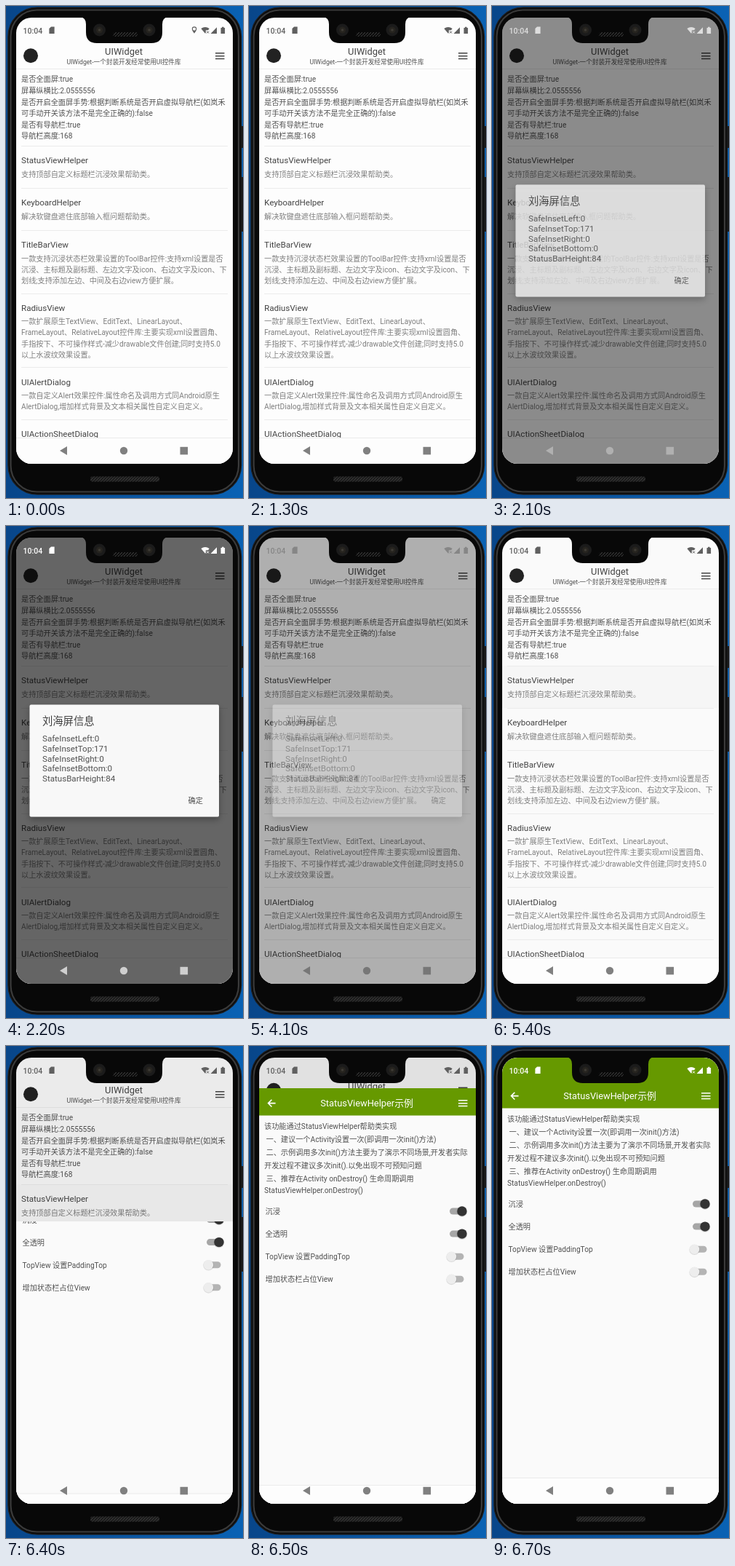
These frames come from a looping animation (326x676 px, 8000 ms). An HTML page:

```html
<!DOCTYPE html>
<html lang="zh-CN">
<head>
<meta charset="utf-8">
<title>UIWidget</title>
<style>
html, body { margin: 0; width: 100%; height: 100%; overflow: hidden; background: #0a5ca8; }
svg { display: block; width: 326px; height: 676px; }
text { font: 10.18px Roboto, "Noto Sans CJK SC", sans-serif; fill: #505050; }
.mid { text-anchor: middle; }
.head { font-size: 12.85px; }
.sub { font-size: 8.65px; }
.title, .body { font-size: 11.6px; }
.title, .head { fill: #444; }
.desc { fill: #7e7e7e; }
.ask { font-size: 14.3px; fill: #404040; }
.white { fill: #fff; }
.clock { font-size: 10.5px; font-weight: 500; fill: inherit; }
</style>
</head>
<body>
<svg viewBox="0 0 326 676">
  <defs>
    <linearGradient id="wall">
      <stop offset="0" stop-color="#08468a"/>
      <stop offset="1" stop-color="#0a62b4"/>
    </linearGradient>
    <pattern id="mesh" width="4" height="4" patternUnits="userSpaceOnUse">
      <path d="M0 4L4 0" stroke="#383838" stroke-width="1.2"/>
    </pattern>
    <clipPath id="glass"><rect x="14" y="16" width="298" height="613" rx="21"/></clipPath>
    <clipPath id="reveal"><rect id="revealBox" x="14" y="700" width="298" height="700"/></clipPath>
    <filter id="lift" x="-10%" y="-10%" width="120%" height="125%">
      <feDropShadow dx="0" dy="4" stdDeviation="5" flood-opacity=".3"/>
    </filter>
  </defs>

  <rect width="326" height="676" fill="url(#wall)"/>
  <path d="M324 165h2v30h-2zm0 70h2v75h-2z" fill="#151515"/>
  <rect x="3" y="2" width="320.5" height="669" rx="40" fill="#0a0a0a" stroke="#1c1c1c" stroke-width="1.5"/>
  <rect x="6.5" y="5.5" width="313.5" height="662" rx="36" fill="#080808" stroke="#3a3a3a" stroke-width="2.2"/>

  <g clip-path="url(#glass)">
    <g id="home">
      <rect id="homeBg" x="14" y="16" width="298" height="640"/>
      <rect id="tap" x="14" y="192" width="298" height="58" fill="#f6f6f6"/>
    </g>
    <rect id="scrim" x="14" y="16" width="298" height="613"/>
    <g clip-path="url(#reveal)"><g id="next">
      <rect x="14" y="16" width="298" height="640" fill="#fafafa"/>
      <rect x="14" y="16" width="298" height="69.5" fill="#690"/>
    </g></g>
    <g id="dialog">
      <rect x="32.5" y="245.5" width="260.5" height="154" rx="2" fill="#f8f8f8" filter="url(#lift)"/>
    </g>

    <g id="status">
      <text class="clock" x="23.5" y="37.5">10:04</text>
      <path d="M62 28.5h4.6v9.5h-7.2v-7z"/>
      <path id="pin" d="M259 28.3a3.2 3.2 0 0 1 3.2 3.3c0 2.3-3.2 6.2-3.2 6.2s-3.2-3.9-3.2-6.2a3.2 3.2 0 0 1 3.2-3.3zm0 1.1a2.1 2.1 0 1 0 0 4.3 2.1 2.1 0 0 0 0-4.3z" fill-rule="evenodd"/>
      <path d="M268.3 31q5.7-4 11.4 0l-1.7 2.3h-3.2v3.4l-.8 1z"/>
      <path d="M276 34.5l3 3m0-3l-3 3" stroke-width="1" class="line"/>
      <path d="M281.5 38l8.5-8.7V38z"/>
      <path d="M295.5 30h1.5v-1.2h2.6V30h1.5v8h-5.6z"/>
    </g>
    <g id="nav">
      <path d="M74 611l10-6v12z"/>
      <circle cx="162" cy="611" r="5.2"/>
      <rect x="239.5" y="605.8" width="10.6" height="10.6"/>
    </g>
  </g>

  <path d="M102 15q8 1 8 10v11q0 15 15 15h75q15 0 15-15V25q0-9 8-10z" fill="#080808"/>
  <g id="lenses"></g>
  <rect x="147" y="36" width="34" height="6" rx="3" fill="url(#mesh)"/>
  <rect x="116" y="646.5" width="95" height="7" rx="3" fill="#191919"/>
  <rect x="116" y="646.5" width="95" height="7" rx="3" fill="url(#mesh)"/>
</svg>
<script>
const $ = id => document.getElementById(id);

function add(parent, tag, attrs, content) {
  const el = document.createElementNS('http://www.w3.org/2000/svg', tag);
  for (const k in attrs) el.setAttribute(k, attrs[k]);
  if (content) el.textContent = content;
  return $(parent).appendChild(el);
}
const label = (parent, x, y, cls, content) => add(parent, 'text', { x, y, class: cls }, content);
const rule = (parent, y, x = 21, w = 284) =>
  add(parent, 'rect', { x, y, width: w, height: 1, fill: '#ebebeb' });
const menu = (parent, stroke) =>
  add(parent, 'path', { d: 'M288 64.8h12.5m-12.5 3.9h12.5m-12.5 3.9h12.5', stroke, 'stroke-width': 1.5 });

function navBar(parent) {
  add(parent, 'rect', { x: 14, y: 593, width: 298, height: 60, fill: '#fdfdfd' });
  rule(parent, 593, 14, 298);
}

// Home page
add('home', 'circle', { cx: 34, cy: 68.3, r: 10, fill: '#222' });
label('home', 162, 67.3, 'mid head', 'UIWidget');
label('home', 162, 80.2, 'mid sub', 'UIWidget-一个封装开发经常使用UI控件库');
const homeMenu = menu('home', '#444');
rule('home', 86, 14, 298);

['是否全面屏:true', '屏幕纵横比:2.0555556',
 '是否开启全面屏手势:根据判断系统是否开启虚拟导航栏(如岚禾',
 '可手动开关该方法不是完全正确的):false', '是否有导航栏:true', '导航栏高度:168']
  .forEach((s, i) => label('home', 21, 104.3 + i * 15.6, '', s));

[
  [216.3, 'StatusViewHelper', '支持顶部自定义标题栏沉浸效果帮助类。'],
  [274.3, 'KeyboardHelper', '解决软键盘遮住底部输入框问题帮助类。'],
  [332.3, 'TitleBarView', '一款支持沉浸状态栏效果设置的ToolBar控件:支持xml设置是否',
    '沉浸、主标题及副标题、左边文字及icon、右边文字及icon、下', '划线;支持添加左边、中间及右边view方便扩展。'],
  [419, 'RadiusView', '一款扩展原生TextView、EditText、LinearLayout、',
    'FrameLayout、RelativeLayout控件库:主要实现xml设置圆角、',
    '手指按下、不可操作样式-减少drawable文件创建;同时支持5.0', '以上水波纹效果设置。'],
  [520.8, 'UIAlertDialog', '一款自定义Alert效果控件:属性命名及调用方式同Android原生',
    'AlertDialog,增加样式背景及文本相关属性自定义自定义。'],
  [592, 'UIActionSheetDialog'],
].forEach(([y, title, ...lines]) => {
  rule('home', Math.round(y - 24.5));
  label('home', 21, y, 'title', title);
  lines.forEach((s, i) => label('home', 21, y + 18.2 + i * 15.2, 'desc', s));
});
navBar('home');

// Dialog
label('dialog', 50, 273.3, 'ask', '刘海屏信息');
['SafeInsetLeft:0', 'SafeInsetTop:171', 'SafeInsetRight:0', 'SafeInsetBottom:0', 'StatusBarHeight:84']
  .forEach((s, i) => label('dialog', 50, 296.3 + i * 13.65, 'body', s));
label('dialog', 250.5, 381, '', '确定');

// Detail page
add('next', 'path', { d: 'M36.5 68.6h-10m4.8-4.9l-4.9 4.9 4.9 4.9', stroke: '#fff', 'stroke-width': 1.6, fill: 'none' });
label('next', 162, 73, 'mid head white', 'StatusViewHelper示例');
menu('next', '#fff');
[
  [21, 104, '该功能通过StatusViewHelper帮助类实现'],
  [23.5, 122, '一、建议一个Activity设置一次(即调用一次init()方法)'],
  [23.5, 140, '二、示例调用多次init()方法主要为了演示不同场景,开发者实际'],
  [21, 158, '开发过程不建议多次init().以免出现不可预知问题'],
  [23.5, 176, '三、推荐在Activity onDestroy() 生命周期调用'],
  [21, 191.5, 'StatusViewHelper.onDestroy()'],
].forEach(([x, y, s]) => label('next', x, y, '', s));

['沉浸', '全透明', 'TopView 设置PaddingTop', '增加状态栏占位View'].forEach((s, i) => {
  const y = 217 + i * 31.1, on = i < 2;
  label('next', 22.5, y + 4, '', s);
  add('next', 'rect', { x: 276, y: y - 4.5, width: 19.5, height: 9, rx: 4.5, fill: on ? '#a6a6a6' : '#b4b4b4' });
  add('next', 'circle', { cx: on ? 293 : 278.5, cy: y + .7, r: 7.2, fill: '#000', opacity: .12 });
  add('next', 'circle', { cx: on ? 293 : 278.5, cy: y, r: 6.7, fill: on ? '#333' : '#ededed' });
});
navBar('next');

// Front cameras
for (const cx of [128.5, 197]) {
  add('lenses', 'circle', { cx, cy: 33, r: 8.5, fill: '#1b1b1b' });
  add('lenses', 'circle', { cx, cy: 33, r: 4.5, fill: '#26241f' });
  add('lenses', 'circle', { cx, cy: 33, r: 1.8, fill: '#3d3a34' });
}

// Each step changes some values and holds them until the next one
const steps = [
  [0, { bg: '#fdfdfd', ink: '#606060', nav: '#808080', pin: 1, menu: 1, dim: 0, dialog: 0, tap: 0, homeY: 0, nextY: 25, top: 700 }],
  [1300, { pin: 0 }],
  [1800, { menu: .9 }],
  [2000, { menu: 1, dim: .15, dialog: .2, ink: '#777' }],
  [2100, { dim: .45, dialog: .75, ink: '#ddd', nav: '#b0b0b0' }],
  [2200, { dim: .6, dialog: 1, ink: '#fff', nav: '#cfcfcf' }],
  [4100, { dim: .31, dialog: .36, ink: '#868686', nav: '#777' }],
  [4200, { bg: '#fafafa', dim: 0, dialog: 0, ink: '#606060', nav: '#808080' }],
  [5200, { tap: .35 }],
  [5300, { tap: .7 }],
  [5400, { tap: 1 }],
  [6400, { dim: .06, homeY: -2, nextY: 21.5, top: 241 }],
  [6500, { dim: .1, homeY: -7.5, nextY: 10, top: 58 }],
  [6600, { homeY: -11, nextY: 2, top: 24, ink: '#fff' }],
  [6700, { homeY: -12, nextY: 0, top: 16 }],
];

const move = (id, y) => $(id).setAttribute('transform', `translate(0 ${y})`);
const fade = (el, a) => { el.style.opacity = a; };

function draw(now) {
  const t = now % 8000;
  const s = Object.assign({}, ...steps.filter(([at]) => at <= t).map(([, change]) => change));
  $('homeBg').setAttribute('fill', s.bg);
  $('status').setAttribute('fill', s.ink);
  $('status').querySelector('.line').setAttribute('stroke', s.ink);
  $('nav').setAttribute('fill', s.nav);
  fade($('pin'), s.pin);
  fade(homeMenu, s.menu);
  fade($('scrim'), s.dim);
  fade($('dialog'), s.dialog);
  fade($('tap'), s.tap);
  move('home', s.homeY);
  move('next', s.nextY);
  $('revealBox').setAttribute('y', s.top);
}

let start;
function tick(now) {
  start ??= now;
  draw(now - start);
  requestAnimationFrame(tick);
}
draw(0);
requestAnimationFrame(tick);
</script>
</body>
</html>
```
